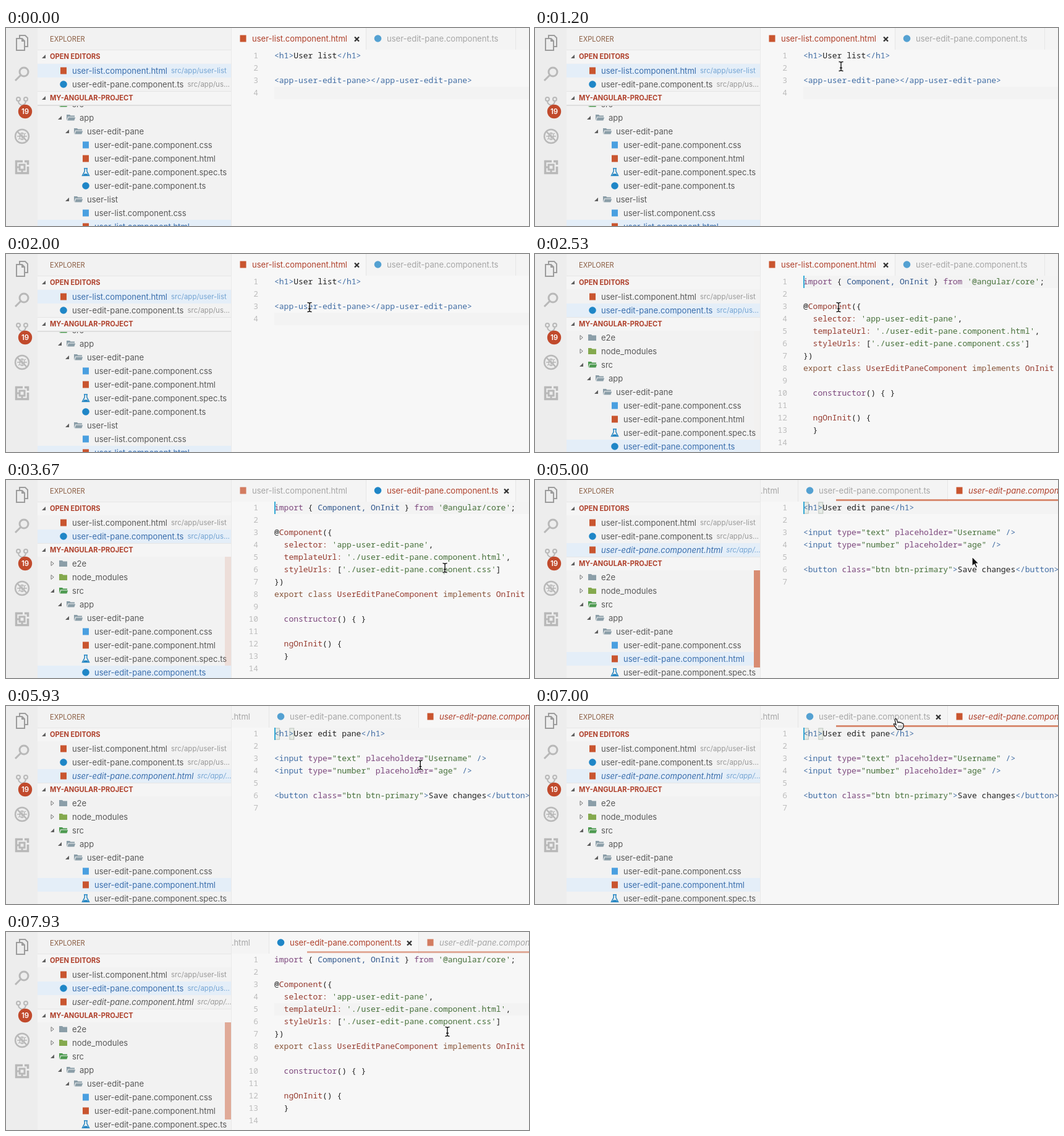
These frames come from a looping animation (846x320 px, 8 s). An HTML page with a canvas:

```html
<!DOCTYPE html>
<html lang="en">
<head>
<meta charset="utf-8">
<title>Editor navigation</title>
<style>
html, body { margin: 0; width: 100%; height: 100%; overflow: hidden; background: #f7f7f7; }
canvas { display: block; width: 846px; height: 320px; }
</style>
</head>
<body>
<canvas id="stage"></canvas>
<script>
const W = 846, H = 320, LOOP = 8000;
const canvas = document.getElementById('stage');
const ctx = canvas.getContext('2d');
const dpr = window.devicePixelRatio || 1;
canvas.width = W * dpr;
canvas.height = H * dpr;

const UI = 'Inter, sans-serif', MONO = '"Noto Sans Mono", monospace';
const UI_SIZE = 13.05, CODE_SIZE = 13, CHAR = 7.8;
const ACCENT = '#af402b', TEXT = '#595959', BLUE = '#3a6ead', SELECTED = '#e4eef8';
const BACK = '#f7f7f7', SIDE = '#f2f2f2', THUMB = '#d88c72';

// Code lines: segments split by "|", the first letter of each picks its colour.
const INK = { p: '#222222', k: '#7b467c', c: '#87553a', i: '#2f568c', r: '#963c30',
  s: '#46703a', t: '#416da4', a: '#7b467c', v: '#46703a' };
const listHtml = ['t<h1>|pUser list|t</h1>', '', 't<app-user-edit-pane></app-user-edit-pane>', ''];
const paneTs = [
  "kimport|p { |iComponent, OnInit|p } |kfrom|s '@angular/core'|p;", '',
  'p@|rComponent|p({',
  "r  selector:|s 'app-user-edit-pane'|p,",
  "r  templateUrl:|s './user-edit-pane.component.html'|p,",
  "r  styleUrls:|p [|s'./user-edit-pane.component.css'|p]",
  'p})',
  'cexport class |rUserEditPaneComponent|c implements |rOnInit|p {', '',
  'k  constructor|p() { }', '',
  'r  ngOnInit|p() {', 'p  }', '', 'p}'];
const paneHtml = [
  't<h1>|pUser edit pane|t</h1>', '',
  't<input |atype=|v"text" |aplaceholder=|v"Username"|t />',
  't<input |atype=|v"number" |aplaceholder=|v"age"|t />', '',
  't<button |aclass=|v"btn btn-primary"|t>|pSave changes|t</button>', ''];

const files = [
  { name: 'user-list.component.html', dir: 'src/app/user-list', icon: 'html', x: 365, w: 218 },
  { name: 'user-edit-pane.component.ts', dir: 'src/app/us…', icon: 'ts', x: 583, w: 242 },
  { name: 'user-edit-pane.component.html', dir: 'src/app/…', icon: 'html', x: 825, w: 260, italic: true }];

// Explorer tree: name, depth, icon, open state of a folder.
const tree = [
  ['e2e', 0, '#8b9ea8', false], ['node_modules', 0, '#84a94e', false], ['src', 0, '#4d9a50', true],
  ['app', 1, '#8b9ea8', true], ['user-edit-pane', 2, '#8b9ea8', true],
  ['user-edit-pane.component.css', 3, 'css'], ['user-edit-pane.component.html', 3, 'html'],
  ['user-edit-pane.component.spec.ts', 3, 'spec'], ['user-edit-pane.component.ts', 3, 'ts'],
  ['user-list', 2, '#8b9ea8', true],
  ['user-list.component.css', 3, 'css'], ['user-list.component.html', 3, 'html']];

const views = [
  { at: 0, blink: -500, code: listHtml, file: 0, open: 2, row: 11, scroll: 56, line: 4 },
  { at: 2530, code: paneTs, file: 1, open: 2, row: 8, scroll: 0, line: 1, thumb: 176 },
  { at: 4600, code: paneHtml, file: 2, open: 3, row: 6, scroll: 0, line: 1, thumb: 157, match: true },
  { at: 7190, code: paneTs, file: 1, open: 3, row: 8, scroll: 0, line: 5, thumb: 157 }];
const viewAt = t => views.filter(v => v.at <= t).pop() || views[0];

// Pointer stops: time, x, y.
const stops = [
  [800, 504, 50], [1200, 495, 62], [1500, 495, 62], [1900, 491, 86], [2750, 491, 86],
  [3400, 710, 142], [3700, 710, 142], [4050, 707, 125], [5600, 707, 125],
  [6500, 587, 28], [7250, 587, 28], [7800, 714, 161], [8000, 714, 161]];

const clamp = v => Math.max(0, Math.min(1, v));
const scrollbarFade = age => clamp(1 - (age - 500) / 800);

function rect(x, y, w, h, color) {
  ctx.fillStyle = color;
  ctx.fillRect(x, y, w, h);
}

function faded(alpha, draw) {
  ctx.globalAlpha = alpha;
  draw();
  ctx.globalAlpha = 1;
}

function text(str, x, y, color, size = UI_SIZE, style = '', family = UI) {
  ctx.font = `${style} ${size}px ${family}`;
  ctx.fillStyle = color;
  ctx.fillText(str, x, y);
  return ctx.measureText(str).width;
}

function shape(d, x, y, { fill, stroke, width = 1 }) {
  const path = new Path2D(d);
  ctx.save();
  ctx.translate(x, y);
  if (fill) { ctx.fillStyle = fill; ctx.fill(path); }
  if (stroke) { ctx.strokeStyle = stroke; ctx.lineWidth = width; ctx.stroke(path); }
  ctx.restore();
}

function dot(x, y, r, color) {
  ctx.fillStyle = color;
  ctx.beginPath();
  ctx.arc(x, y, r, 0, 7);
  ctx.fill();
}

function clip(x, y, w, h, draw) {
  ctx.save();
  ctx.beginPath();
  ctx.rect(x, y, w, h);
  ctx.clip();
  draw();
  ctx.restore();
}

function fileIcon(kind, x, y) {
  if (kind === 'ts') dot(x, y, 5.8, '#1f86c7');
  else if (kind === 'spec') {
    shape('M-3-6H3M-1.8-6V-1.5L-5.5 5.5H5.5L1.8-1.5V-6', x, y, { stroke: '#2385c2', width: 1.5 });
    shape('M-2.5 2.5H2.5L4 5H-4Z', x, y, { fill: '#2385c2' });
  } else rect(x - 5, y - 5.5, 10, 11, kind === 'css' ? '#4a9fe0' : '#c9552f');
}

function folder(x, y, color, open) {
  shape('M-7-5H-2L-.5-3.5H6V5H-7Z', x, y, { fill: color });
  if (open) shape('M-4.5-1H8L5.8 5H-6.5Z', x, y, { fill: color, stroke: SIDE, width: 1.1 });
}

function twisty(x, y, open) {
  if (open) shape('M3-3V3H-3Z', x, y, { fill: '#5f5f5f' });
  else shape('M-2-3.5L2.2 0L-2 3.5Z', x, y, { stroke: '#777' });
}

function activityBar() {
  rect(0, 0, 51, H, '#ededed');
  const gray = { stroke: '#b8b8b8', width: 2.4 };
  shape('M-4-8V-12H5L9-8V6H4M-9-7H0L4-3V12H-9ZM0-7V-3H4', 26, 24, { stroke: '#9c9c9c', width: 2 });
  shape('M11-4A7 7 0 1 1-3-4A7 7 0 1 1 11-4M-1 1L-10 10', 25, 75, { ...gray, width: 3 });
  shape('M-3-4A3 3 0 1 1-9-4A3 3 0 1 1-3-4M9-4A3 3 0 1 1 3-4A3 3 0 1 1 9-4M-6-1Q-6 4 0 6Q6 4 6-1M0 6V12',
    26, 119, { ...gray, width: 2 });
  dot(31, 135, 11.2, '#c14a2c');
  ctx.textAlign = 'center';
  text('19', 31, 139.2, '#fff', 11.5, '600');
  ctx.textAlign = 'left';
  shape('M11 0A11 11 0 1 1-11 0A11 11 0 1 1 11 0M-8-8L8 8', 26, 175, gray);
  shape('M-4 0A4 5.5 0 1 0 4 0A4 5.5 0 1 0-4 0M-8 0H8M-6-5L-3-3M6-5L3-3M-6 5L-3 3M6 5L3 3M0-5V5',
    26, 175, { ...gray, width: 1.5 });
  shape('M1-9.5H-9.5V9.5H9.5V-1M4-9.5H9.5V-4', 26, 225, { ...gray, width: 3.5 });
  shape('M-4-4H4V4H-4ZM-9 0H-4M0 4V9', 26, 225, { ...gray, width: 3 });
}

function sectionHeader(label, y) {
  rect(51, y - 11, 313, 22, '#f5f5f5');
  rect(51, y - 11, 313, 1, '#e6e6e6');
  twisty(61, y, true);
  text(label, 71, y + 4, ACCENT, 11.1, '700');
}

function openEditors(view) {
  files.slice(0, view.open).forEach((file, i) => {
    const y = 69 + i * 22, active = i === view.file, style = file.italic ? 'italic' : '';
    if (active) rect(51, y - 11, 313, 22, SELECTED);
    fileIcon(file.icon, 93, y);
    const w = text(file.name, 107, y + 4.6, active ? BLUE : TEXT, UI_SIZE, style);
    text(file.dir, 107 + w + 6, y + 4.4, active ? '#74a4d3' : '#999', 11.5, style);
  });
}

function explorer(view, age) {
  const top = 80 + view.open * 22;
  clip(51, top, 313, H - top, () => {
    tree.forEach(([name, depth, icon, open], i) => {
      const y = top + 11 + i * 22 - view.scroll, x = 107 + depth * 12, active = i === view.row;
      if (active) rect(51, y - 11, 313, 22, SELECTED);
      if (open === undefined) fileIcon(icon, x - 14, y);
      else {
        twisty(x - 32, y, open);
        folder(x - 14, y, icon, open);
      }
      text(name, x, y + 4.6, active ? BLUE : TEXT);
    });
    if (view.scroll) rect(51, top, 313, 2, '#dedede');
    if (view.thumb)
      faded(clamp(age / 100) * scrollbarFade(age), () => rect(354, top, 10, view.thumb, THUMB));
  });
  sectionHeader('MY-ANGULAR-PROJECT', top - 11);
}

function tabs(view, age, hovered) {
  const shift = view.open === 3 ? 157 : 0;
  clip(365, 0, W - 365, 35, () => {
    rect(365, 0, W - 365, 35, '#f4f4f4');
    files.slice(0, view.open).forEach((file, i) => {
      const x = file.x - shift, active = i === view.file;
      if (active) rect(x, 0, file.w, 35, BACK);
      rect(x + file.w - 1, 0, 1, 35, '#e6e6e6');
      faded(active ? 1 : .75, () => fileIcon(file.icon, x + 18.5, 17));
      text(file.name, x + 33, 21.6, active ? ACCENT : '#a5a5a5', UI_SIZE, file.italic ? 'italic' : '');
      if (active || i === hovered)
        shape('M-3.5-3.5L3.5 3.5M3.5-3.5L-3.5 3.5', x + file.w - 15.5, 18, { stroke: '#333', width: 2.3 });
    });
    if (shift)
      faded(hovered < 0 ? scrollbarFade(age) : 1, () => rect(487, 31, W - 487, 3, THUMB));
  });
}

function editor(view, caretOn) {
  const lineTop = n => 15 + n * 20;
  rect(434, lineTop(view.line), W - 434, 20, '#f3f3f3');
  if (view.match) for (const col of [0, 3]) {
    rect(435 + col * CHAR, 35.5, CHAR, 19, '#b9c2b9');
    rect(436 + col * CHAR, 36.5, CHAR - 2, 17, '#e6ebe6');
  }
  view.code.forEach((line, i) => {
    const y = lineTop(i + 1) + 14.2;
    ctx.textAlign = 'right';
    text(String(i + 1), 408, y, '#bdbdbd', CODE_SIZE, '', MONO);
    ctx.textAlign = 'left';
    let x = 434;
    if (line) for (const part of line.split('|'))
      x += text(part.slice(1), x, y, INK[part[0]], CODE_SIZE, '', MONO);
  });
  if (caretOn) rect(434, lineTop(view.line), 2, 20, '#35a9d6');
}

function pointerAt(t) {
  const i = stops.findIndex(s => s[0] > t);
  if (i < 1) return null;
  const [t0, x0, y0] = stops[i - 1], [t1, x1, y1] = stops[i];
  const u = clamp((t - t0) / (t1 - t0)), e = u * u * (3 - 2 * u);
  return { x: x0 + (x1 - x0) * e, y: y0 + (y1 - y0) * e };
}

function drawPointer({ x, y }, t) {
  const solid = { fill: '#111', stroke: '#fff', width: 1.2 };
  if (t >= 4600 && t < 5600) {
    shape('M0-1V14.5L3.6 11.2L6.2 17L8.7 15.8L6.2 10.2H11Z', x, y, solid);
  } else if (y < 35) {
    shape('M-5-6Q-3.5-9-2-6L0-1Q2-3 3.5-1Q5.5-2.5 6.5 0Q9-.5 9 2V6L6.5 10H-1L-6 3Q-8 0-5 1L-3 2.5Z',
      x, y, { fill: '#fff', stroke: '#222', width: 1.3 });
    shape('M1 3V7M3.5 3V7M6 3V7', x, y, { stroke: '#444', width: .8 });
  } else {
    const beam = 'M-3.5-7.5Q-.5-7.5 0-6Q.5-7.5 3.5-7.5M0-6V6M-3.5 7.5Q-.5 7.5 0 6Q.5 7.5 3.5 7.5M-2 2.5H2';
    shape(beam, x, y, { stroke: '#fff', width: 3 });
    shape(beam, x, y, { stroke: '#111', width: 1.4 });
  }
}

function draw(t) {
  const view = viewAt(t), age = t - view.at;
  const pointer = pointerAt(t);
  const hovered = view.open === 3 && pointer && pointer.y < 35 ? 1 : -1;
  const caretOn = (t - (view.blink ?? view.at)) % 1000 < 500;
  ctx.setTransform(dpr, 0, 0, dpr, 0, 0);
  rect(0, 0, W, H, BACK);
  activityBar();
  clip(51, 0, 314, H, () => {
    rect(51, 0, 314, H, SIDE);
    text('EXPLORER', 71, 22, '#8a5d42', 11.1);
    sectionHeader('OPEN EDITORS', 46);
    openEditors(view);
    explorer(view, age);
    rect(364, 0, 1, H, '#e9e9e9');
  });
  editor(view, caretOn);
  tabs(viewAt(t - 60), age, hovered); // the tab strip refreshes just after the editor
  if (pointer) drawPointer(pointer, t);
}

const start = performance.now();
function frame() {
  draw((performance.now() - start) % LOOP);
  requestAnimationFrame(frame);
}
frame();
</script>
</body>
</html>
```
